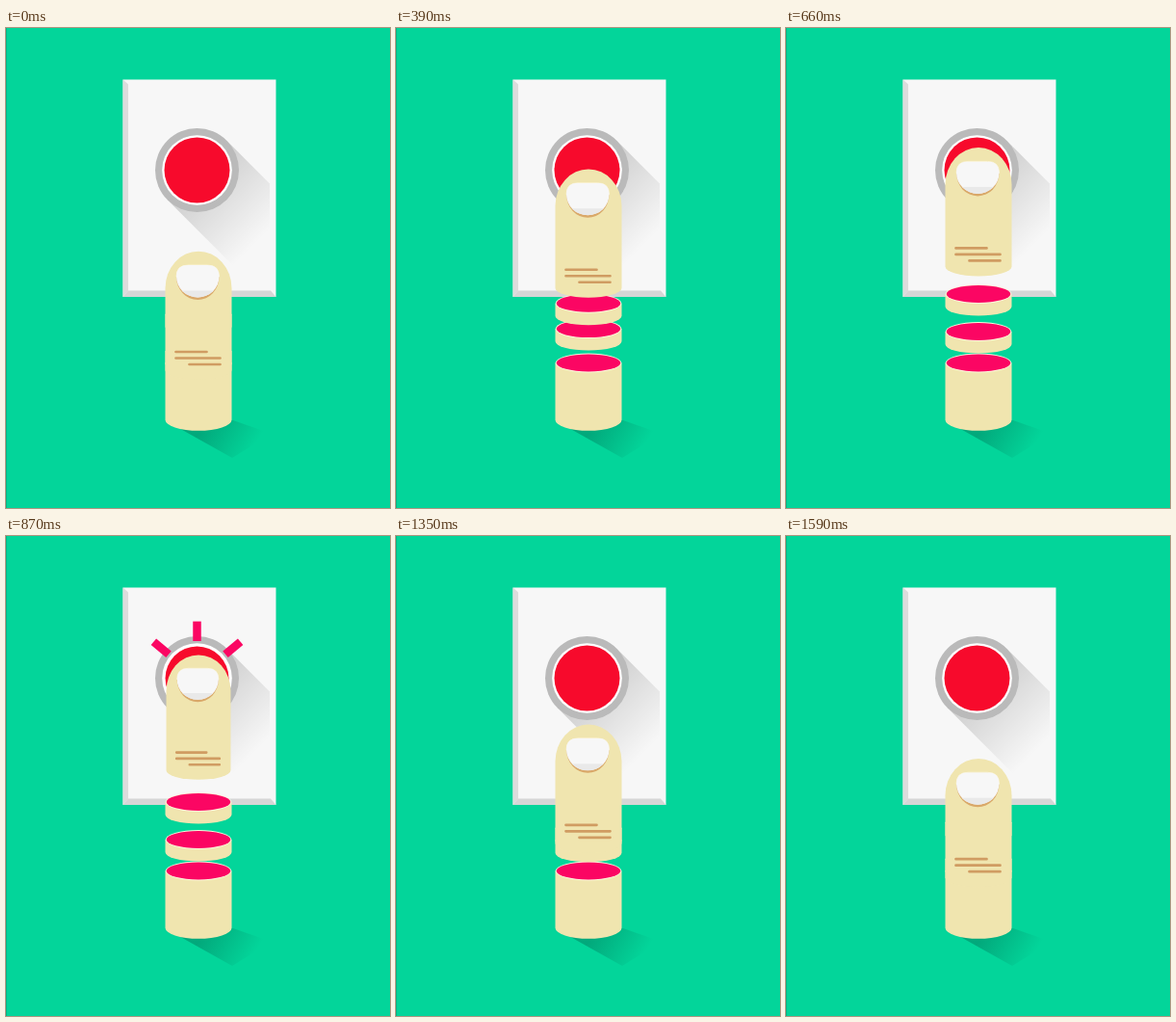
Recreate the animation shown at these times as an HTML page. Size 399 px wide and 498 px high, loop 1650 ms.

```html
<!DOCTYPE html>
<html lang="en">
<head>
<meta charset="utf-8">
<title>Push the button</title>
<style>
  html, body { margin: 0; width: 100%; height: 100%; overflow: hidden; background: #03d59a; }
  svg { display: block; width: 100%; height: 100%; }
  .skin { fill: #f0e5af; }
  .rim { fill: #fdf6dc; }
  .flesh { fill: #fb0663; }
  .crease { fill: none; stroke: #d09c62; stroke-width: 2.7; stroke-linecap: round; }
  #rays line { stroke: #fb0663; stroke-width: 8.5; }
</style>
</head>
<body>
<svg viewBox="0 0 399 498">
  <defs>
    <linearGradient id="buttonShade" gradientUnits="userSpaceOnUse" x1="208" y1="157" x2="267" y2="216">
      <stop offset="0" stop-color="#000" stop-opacity=".15"/>
      <stop offset="1" stop-color="#000" stop-opacity="0"/>
    </linearGradient>
    <linearGradient id="fingerShade" gradientUnits="userSpaceOnUse" x1="208" y1="408" x2="256" y2="437">
      <stop offset="0" stop-color="#004a3a" stop-opacity=".32"/>
      <stop offset="1" stop-color="#004a3a" stop-opacity="0"/>
    </linearGradient>
    <g id="cut">
      <ellipse class="rim" cx="200" rx="34.3" ry="10"/>
      <ellipse class="flesh" cx="200" rx="33.3" ry="9"/>
    </g>
    <g id="slice">
      <path class="skin" d="M165.5 0V13A34.5 9.5 0 0 0 234.5 13V0Z"/>
      <use href="#cut"/>
    </g>
    <clipPath id="nailClip">
      <path d="M177 258Q177 246 189 246H209.500Q221.500 246 221.500 258A22.250 21.500 0 0 1 177 258Z"/>
    </clipPath>
  </defs>

  <rect width="399" height="498" fill="#03d59a"/>
  <rect width="1" height="498" fill="#05b585"/>

  <!-- switch plate -->
  <rect x="121.500" y="53.500" width="159" height="225.500" fill="#f7f7f7"/>
  <path d="M121.500 53.500L127 58.500V272.500L121.500 279Z" fill="#dcdcdc"/>
  <path d="M121.500 279L127 272.500H275L280.500 279Z" fill="#d6d6d6"/>
  <path d="M229.300 116.700L274 161.400V272H261.500L167.700 178.300Z" fill="url(#buttonShade)"/>
  <circle cx="198.500" cy="147.500" r="43.500" fill="#bababa"/>
  <circle cx="198.500" cy="147.500" r="36.300" fill="#fff"/>
  <circle id="red" cx="198.500" cy="147.500" r="34" fill="#f70a2c"/>
  <g id="rays">
    <line transform="translate(198.500 147.500) rotate(-50)"/>
    <line transform="translate(198.500 147.500)"/>
    <line transform="translate(198.500 147.500) rotate(50)"/>
  </g>

  <!-- finger -->
  <path d="M176 413L235 446L276 421L233 406Z" fill="url(#fingerShade)"/>
  <path class="skin" d="M165.500 347.500V406.500A34.500 11.300 0 0 0 234.500 406.500V347.500Z"/>
  <use href="#cut" y="347.500"/>
  <use id="low" href="#slice"/>
  <use id="high" href="#slice"/>
  <g id="tip">
    <path class="skin" d="M165.500 270A34.500 38.300 0 0 1 234.500 270V355A34.500 10 0 0 1 165.500 355Z"/>
    <path d="M177 258A22.250 24 0 0 0 221.500 258Z" fill="#d9a869"/>
    <path d="M177 258Q177 246 189 246H209.500Q221.500 246 221.500 258Z" fill="none" stroke="#faf2d2"/>
    <g clip-path="url(#nailClip)">
      <rect x="176" y="245" width="47" height="36" fill="#f7f7f7"/>
      <rect x="176" y="272.500" width="47" height="9" fill="#e9e9e9"/>
    </g>
    <path class="crease" d="M176.500 336H208.500M176.500 342.500H222.500M190.500 349H222.500"/>
  </g>
</svg>
<script>
  const LOOP = 1650, STEP = 30;
  const $ = id => document.getElementById(id);
  const rays = document.querySelectorAll('#rays line');
  const clamp = u => Math.min(1, Math.max(0, u));
  const mix = (a, b, u) => a + (b - a) * u;

  // Exponential settling from 0 to 1, trimmed so that it really arrives.
  const settle = (t, k, trim) =>
    t <= 0 ? 0 : clamp((1 - Math.exp(-k * t)) / (1 - trim));
  const cubicOut = u => 1 - (1 - clamp(u)) ** 3;

  function scaleAbout(x, y, s) {
    return `translate(${x} ${y}) scale(${s}) translate(${-x} ${-y})`;
  }

  function draw(t) {
    const back = settle(Math.min(t, 1590) - 1260, 0.012, 0.012);
    const reach = settle(t - 220, 0.0088, 0.008) * (1 - back);
    const split = cubicOut((t - 222) / 370) * (1 - back);
    const press = clamp((t - 780) / 300);
    const size = 1 - 0.037 * Math.sin(Math.PI * press);

    $('tip').setAttribute('transform',
      `${scaleAbout(199.5, 147.5, size)} translate(0 ${-109 * reach})`);
    $('red').setAttribute('transform', scaleAbout(198.5, 147.5, size));
    $('high').setAttribute('y', mix(335.5, 276, split));
    $('low').setAttribute('y', mix(297, 315, split));

    const inner = mix(38.5, 72.5, clamp((t - 900) / 180));
    const outer = mix(38.5, 72.5, clamp((t - 780) / 150));
    for (const ray of rays) {
      ray.setAttribute('y1', -inner);
      ray.setAttribute('y2', -outer);
      ray.setAttribute('visibility', outer > inner ? 'visible' : 'hidden');
    }
  }

  const start = performance.now();
  function tick() {
    const t = (performance.now() - start) % LOOP;
    draw(Math.floor(t / STEP) * STEP);
    requestAnimationFrame(tick);
  }
  tick();
</script>
</body>
</html>
```
